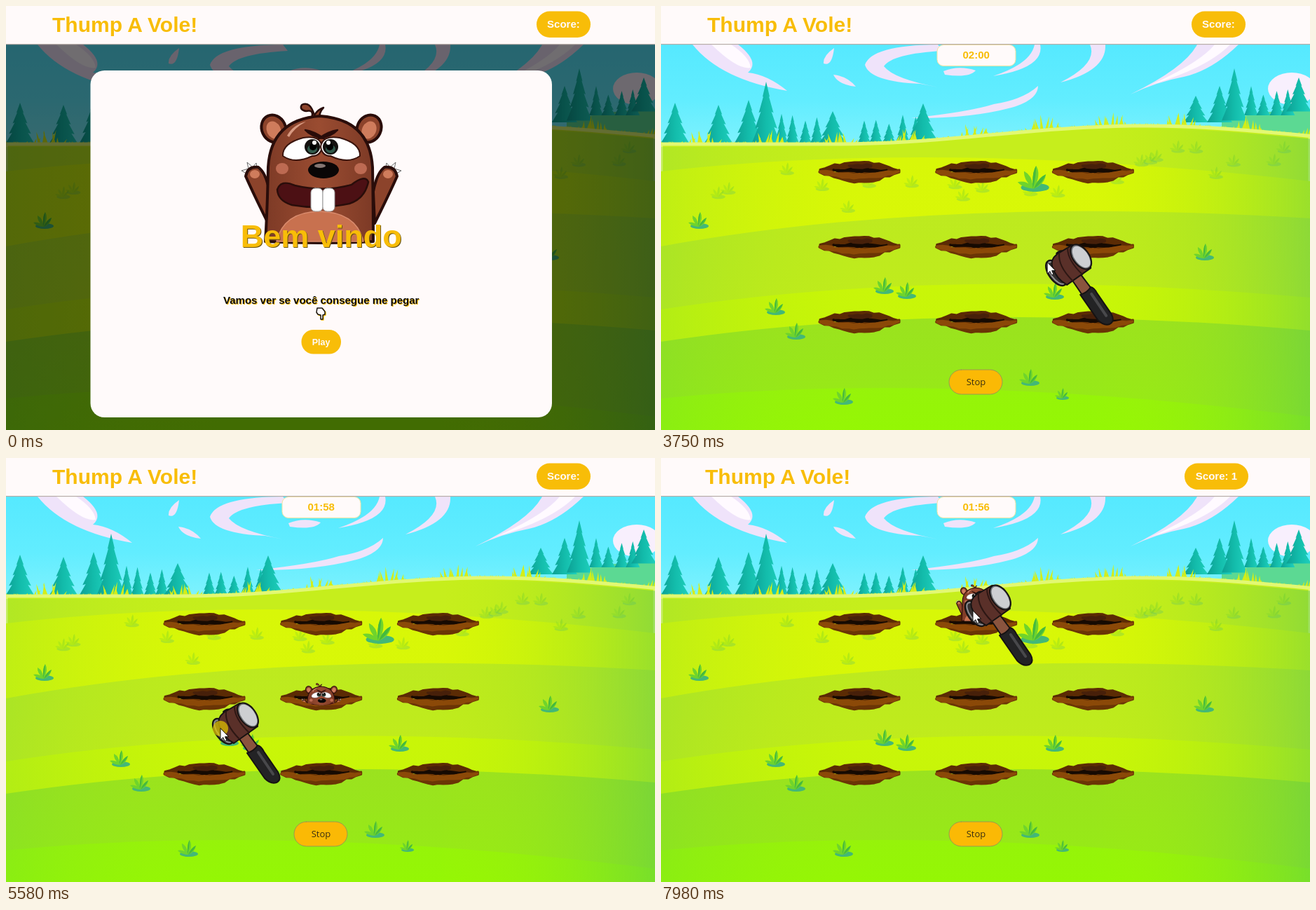
An HTML page for the animation above (8 s loop, 926 by 605 pixels).

```html
<!DOCTYPE html>
<html lang="pt">
<head>
<meta charset="utf-8">
<title>Thump A Vole!</title>
<style>
html,body{margin:0;width:100%;height:100%;overflow:hidden}
svg{display:block;width:100%;height:100%}
text{font-family:"Liberation Sans",Arial,sans-serif;font-weight:700}
.thin{font-family:"Open Sans",sans-serif;font-weight:400}
</style>
</head>
<body>
<svg id="stage" viewBox="0 0 926 605" preserveAspectRatio="none"></svg>
<script>
const LOOP = 8000, GOLD = '#f8bd08', SNOW = '#fffafa';
const stage = document.getElementById('stage');

// ---- drawing helpers ----
const path = (d, fill, extra = '') => `<path d="${d}" fill="${fill}" ${extra}/>`;
const oval = (x, y, rx, ry, fill, rot = 0, extra = '') =>
  `<ellipse cx="${x}" cy="${y}" rx="${rx}" ry="${ry}" fill="${fill}" transform="rotate(${rot} ${x} ${y})" ${extra}/>`;
const pill = (x, y, w, h, r, fill, extra = '') =>
  `<rect x="${x}" y="${y}" width="${w}" height="${h}" rx="${r}" fill="${fill}" ${extra}/>`;
const label = (x, y, size, fill, txt, extra = '') =>
  `<text x="${x}" y="${y}" font-size="${size}" fill="${fill}" ${extra}>${txt}</text>`;
const place = (x, y, body, extra = '') => `<g transform="translate(${x} ${y})" ${extra}>${body}</g>`;
const ink = (color, width) => `stroke="${color}" stroke-width="${width}" stroke-linejoin="round" stroke-linecap="round"`;
const mid = 'text-anchor="middle"';
const grad = (id, across, ...stops) => `<linearGradient id="${id}" x2="${across}" y2="${1 - across}">` +
  stops.map((c, i) => `<stop offset="${i / (stops.length - 1)}" stop-color="${c}"/>`).join('') + '</linearGradient>';

let seed = 11;
const rnd = (a = 0, b = 1) => a + (b - a) * ((seed = seed * 16807 % 2147483647) / 2147483647);
const repeat = (n, make) => Array.from({ length: n }, (_, i) => make(i)).join('');

// points of a curve y(u), u = 0..1, from x = a to x = b
const curve = (a, b, n, y, jitter = 0) => Array.from({ length: n + 1 }, (_, i) =>
  `${(a + (b - a) * i / n).toFixed(1)} ${(y(i / n) + rnd(-jitter, jitter)).toFixed(1)}`).join('L');

// ---- scenery ----
const ridge = x => 184 + 13 * Math.cos(Math.max(0, x - 250) * Math.PI / 440);

function tree(x, top, base, w) {
  const h = base - top, tiers = 4;
  const side = s => {
    const pts = [];
    for (let i = 1; i <= tiers; i++) {
      const k = i / tiers, y = top + h * k;
      pts.push(`${x + s * w / 2 * k} ${y}`);
      if (i < tiers) pts.push(`${x + s * w / 2 * k * .72} ${y - h * .02}`);
    }
    return pts;
  };
  return path(`M${x} ${top}L${side(1).join('L')}L${side(-1).reverse().join('L')}Z`, 'url(#pine)');
}

function woods() {
  const small = (from, to, base, tall) => {
    let s = '';
    for (let x = from; x < to; x += rnd(14, 23)) s += tree(x, base(x) - rnd(.6, 1) * tall, base(x), 20);
    return s;
  };
  const tall = [[20, 138], [82, 141], [125, 134], [150, 108], [245, 150], [374, 139]];
  const far = [[763, 128], [797, 114], [818, 89], [910, 102]];
  return small(172, 236, ridge, 48) + small(290, 366, ridge, 42) + tall.map(([x, y]) => tree(x, y, ridge(x), 42)).join('') +
    small(842, 895, () => 156, 46) + far.map(([x, y]) => tree(x, y, 166 - Math.max(0, x - 800) * .14, 36)).join('');
}

// grass blades whose height swells in clumps along the ridge
function fringe() {
  let d = '';
  for (let x = 4; x < 926; x += 5) {
    const swell = Math.max(0, Math.sin(x / 15.5 - 2.2)), y = ridge(x), h = 4 + 17 * swell * rnd(.5, 1.1);
    d += `M${x - 3} ${y + 5}L${x + rnd(-6, 8)} ${y - h}L${x + 3} ${y + 5}Z`;
  }
  return path(d, '#d3ee18');
}

const tuft = (x, y, s, opacity = 1) => `<use href="#tuft" transform="translate(${x} ${y}) scale(${s})" opacity="${opacity}"/>`;
const tuftShape = oval(3, 9, 13, 4, '#43b877') +
  path('M1 10Q-9 9-13 4Q-4 2 1 10Q-8 1-7-6Q1-2 1 10Q0-5 4-11Q9-3 2 10Q6 0 13-3Q12 6 2 10Z', '#6fd42c') +
  path('M2 10Q6 0 13-3Q10 5 2 10ZM1 10Q0-5 4-11Q4 0 1 10Z', '#45b93e');

function scenery() {
  const lilac = '#efe3fa';
  const clouds = 'M45 55Q85 105 180 121Q152 98 124 95Q142 80 110 55Z' +
    'M247 60Q231 71 232 82Q244 87 247 60ZM246 98Q252 112 278 115Q266 100 246 98Z' +
    'M395 55Q300 56 291 84Q298 108 370 111L396 116Q332 104 318 86Q330 68 402 64Z' +
    'M403 93Q425 84 449 92Q440 103 405 98Z' +
    'M474 100Q528 82 533 55H541Q548 88 474 100Z' +
    'M612 55Q624 82 570 109Q636 92 634 55Z' +
    'M357 160Q440 151 475 140Q518 133 538 114Q538 134 500 145Q440 161 357 160Z' +
    'M670 126Q748 88 765 55H824Q786 92 746 101Q708 108 670 126Z';
  // lower edge of each band: left, middle and right height, then its colours from top to bottom
  const bands = [
    [236, 190, 250, '#d8f708', '#dafa04'],
    [343, 270, 303, '#bdea1f', '#c4ee16'],
    [433, 370, 416, '#c9f608', '#c4f40a'],
    [479, 418, 463, '#9be21f', '#95ec14'],
    [560, 520, 586, '#96f30a', '#94f704']];
  return pill(0, 55, 926, 160, 0, 'url(#sky)') + path(clouds, lilac) +
    path('M72 55Q110 92 128 88Q126 72 100 55ZM700 112Q770 80 790 55H812Q780 88 700 112Z', '#fffaff') +
    oval(900, 118, 34, 23, '#f8effd') + path('M800 165Q870 145 926 150V200H800Z', '#5cd993') + woods() + fringe() +
    path(`M${curve(0, 926, 40, u => ridge(u * 926))}V605H0Z`, '#c6ee1c', ink('#e2f873', 5)) +
    bands.map(([l, m, r, a, b], i) => grad('band' + i, 0, a, b) +
      path(`M0 ${l}Q400 ${m} 926 ${r}V605H0Z`, `url(#band${i})`)).join('') +
    path(`M${curve(0, 926, 40, u => ridge(u * 926) + 4)}V605H0Z`, 'url(#shade)') +
    repeat(22, () => { const x = rnd(50, 910); return tuft(x, ridge(x) + rnd(16, 90), .75, .25); }) +
    [[52, 305], [773, 350], [316, 398], [348, 405], [559, 406], [161, 428], [190, 463], [524, 529], [258, 556], [571, 553]]
      .map(([x, y]) => tuft(x, y, x === 571 ? .7 : 1)).join('') + tuft(529, 245, 1.55);
}

// ---- mole: paired parts are drawn once and mirrored about x = 450 ----
const both = part => part + `<g transform="translate(900) scale(-1 1)">${part}</g>`;

function moleShape() {
  const line = ink('#2a0d0a', 4), thin = ink('#2a0d0a', 2.5);
  const fur = '#8c432b', skin = '#cf7c5c';
  const limbs = path('M345 240L336 235L346 232L344 223L352 230L357 224L359 234Z', '#fff', ink('#666', 1)) +
    path('M374 310Q354 270 342 243Q345 228 360 230Q371 238 376 265Z', fur, line) + oval(355, 240, 7, 6, skin) +
    oval(382, 175, 17, 20, fur, -25, line) + oval(382, 177, 10, 13, skin, -25);
  const face = oval(394, 232, 9, 8, '#bd6a52') +
    path('M395 214Q394 196 424 188Q449 184 451 201Q449 214 437 214Q412 226 395 214Z', '#fff', ink('#3a150e', 2)) +
    oval(437, 201, 11, 11, '#14110f') + oval(437, 204, 7, 6, '#31594a') + oval(438, 201, 5, 5, '#000') + oval(440, 195, 3, 3, '#fff') +
    path('M427 177Q440 179 454 189Q436 187 427 177Z', '#2a0d0a', thin);
  return place(-449, -137, both(limbs) +
    path('M436 160Q440 147 428 150Q418 148 422 141Q434 135 440 156Q444 148 453 145Q447 151 447 160Z', fur, thin) +
    path('M370 336Q373 290 374 230Q378 162 448 157Q519 162 523 230Q524 290 524 336Q447 340 370 336Z', 'url(#fur)', line) +
    path('M386 336Q396 294 447 293Q500 294 510 336Z', '#c8714f', ink('#d98b6d', 1.5)) +
    path('M401 185Q410 169 428 165Q411 174 404 187Z', '#d89a82') + both(face) +
    oval(453, 234, 22, 12, '#0a0606') + oval(448, 228, 8, 3, '#857672') +
    path('M387 262Q392 247 412 256Q453 266 493 255Q512 240 517 251Q512 275 490 282Q448 291 408 284Q388 278 387 262Z', '#4c1014', thin) +
    [435, 452].map(x => pill(x, 260, 17, 33, 6, '#fff', ink('#999', 1))).join(''));
}

// ---- props ----
function holeShape() {
  const arch = u => Math.sin(Math.PI * u);
  const soil = (a, b, n, top, bottom, rough, color) =>
    path(`M${curve(a, b, n, top, rough)}L${curve(b, a, n, u => bottom(1 - u), rough)}Z`, color, ink(color, 3));
  return soil(5, 117, 16, u => 16 - 12 * arch(u) ** .8, () => 17, 1.6, '#5b2b04') +
    soil(24, 100, 9, u => 16 - 3 * arch(u), u => 16 + 3 * arch(u), 1.4, '#160a02') +
    soil(46, 78, 5, () => 8, u => 9 + 3 * arch(u), 1, '#47200a') +
    soil(4, 118, 16, u => 16 + 5 * arch(u), u => 18 + 14 * arch(u) ** 1.1, 1.5, '#6a3505') +
    soil(5, 117, 14, u => 16 + 5 * arch(u), u => 18 + 9 * arch(u), 1.3, '#8b4908');
}

function hammerShape() {
  const edge = ink('#161212', 2), tilt = -36;
  return path('M25 12L37 4L56 29L42 37Z', '#8a543e', edge) +
    path('M38 35Q48 32 53 24Q58 25 62 33L82 62Q88 73 80 77Q72 80 63 71Z', '#232325', edge) +
    path('M54 34L75 65', 'none', ink('#48484b', 4)) +
    path('M4-24Q10-30 17-26L10-16Z', '#54302a', edge) +
    oval(4, 4, 11, 21, '#34302f', tilt, edge) + oval(4, 4, 8, 18.5, 'none', tilt, ink('#8d8f94', 2)) +
    path('M27-36L5-23Q-5-15-2-5Q4 13 19 21L53-3Q50-32 27-36Z', '#5a3029', edge) +
    path('M20-31Q20-14 41 6M8-24Q6-6 27 15', 'none', ink('#2d1714', 2)) +
    oval(39, -19, 11.5, 20, '#6f7276', tilt, edge) + oval(39.5, -19, 9.5, 17.5, '#cdcfd2', tilt);
}

// ---- layout ----
const spot = i => [283 + i % 3 * 166.7, 219 + 107 * Math.floor(i / 3)];
const popup = (id, i) => place(...spot(i), `<g id="${id}"><use href="#mole" transform="scale(.262)"/></g>`, 'clip-path="url(#pit)"');
const shadowed = (x, y, size, color, shade, txt) => label(x + 1, y + 1, size, shade, txt, mid) + label(x, y, size, color, txt, mid);
const hand = color => path('M444 431H451L455 436V440L452 441V447H449V441L445 440L443 437Z', color === GOLD ? GOLD : SNOW, ink(color, 1.5));

stage.innerHTML = '<defs>' +
  grad('sky', 0, '#56e9ff', '#62edff', '#86f3fd') + grad('pine', 1, '#0c9f93', '#13bcab', '#1fd0bd') +
  grad('fur', 1, '#7d3a26', '#9a4c31', '#7d3a26') +
  grad('shade', 1, '#68cf4038', '#b8f00000', '#b8f00000', '#5cc85080') +
  '<clipPath id="pit"><path d="M-34-60H34V16Q20 27 0 27Q-20 27-34 16Z"/></clipPath>' +
  `<g id="tuft">${tuftShape}</g><g id="hole">${holeShape()}</g><g id="mole">${moleShape()}</g></defs>` +
  scenery() +
  '<g id="game">' +
    repeat(9, i => `<use href="#hole" x="${spot(i)[0] - 61}" y="${spot(i)[1]}"/>`) + popup('moleA', 4) + popup('moleB', 1) +
    pill(411, 519, 76, 35, 17.5, '#fbb905', ink('#9a9a50', 1)) + label(449.5, 541, 13, '#3b3010', 'Stop', mid + ' class="thin"') +
    pill(394, 55.5, 112, 30, 9, SNOW, ink('#f3e3a0', 1)) + label(449.7, 75, 15, GOLD, '', mid + ' id="timer"') +
  '</g><g id="welcome">' +
    pill(0, 55, 926, 550, 0, '#000', 'opacity=".56"') + pill(120.5, 92, 658.5, 495, 20, SNOW) +
    '<use href="#mole" x="449" y="137"/>' +
    shadowed(449.7, 344, 45, GOLD, '#6b5310', 'Bem vindo') +
    shadowed(449.7, 424.5, 15, '#0c0a08', GOLD, 'Vamos ver se você consegue me pegar') +
    place(1, 1, hand(GOLD)) + hand('#17120c') +
    pill(421.5, 462, 56.5, 34.5, 17, GOLD) + label(449.6, 483.5, 12.5, SNOW, 'Play', mid) +
  '</g>' +
  pill(0, 0, 926, 54.5, 0, SNOW) + pill(0, 54, 926, 1.2, 0, '#b7ada8') +
  label(66, 37, 30, GOLD, 'Thump A Vole!', 'id="title"') +
  pill(757, 7.5, 77, 37.5, 18.7, GOLD, 'id="badge"') + label(795.4, 31.3, 15, SNOW, '', mid + ' id="score"') +
  `<g id="hammer">${hammerShape()}</g><circle id="click" r="11" fill="#e2c400" opacity=".72"/>` +
  '<g id="cursor">' + path('M0 0V16.2L3.8 12.7L6.2 18L8.8 16.9L6.5 11.7H11.4Z', '#fff', ink('#111', 1)) + '</g>';

// ---- motion: turning points of the pointer as time, x, y ----
const trail = [[460, 886, 603], [600, 911, 583], [850, 911, 583], [1450, 427, 420], [1680, 439, 476], [1860, 452, 472],
  [3430, 452, 472], [3660, 570, 400], [4060, 427, 270], [4200, 486, 316], [4330, 451, 310], [4420, 451, 310],
  [4900, 260, 365], [5280, 282, 411], [5500, 306, 386], [5900, 306, 386], [6780, 455, 330], [7050, 442, 246],
  [7210, 450, 164], [7510, 442, 251], [7680, 445, 218], [LOOP, 445, 218]];

const slope = (i, k) => i < 0 || i > trail.length - 2 ? 0 : (trail[i + 1][k] - trail[i][k]) / (trail[i + 1][0] - trail[i][0]);
// monotone cubic: never overshoots its points
const tangent = (i, k) => {
  const a = slope(i - 1, k), b = slope(i, k);
  return a * b <= 0 ? 0 : Math.sign(a) * Math.min(Math.abs(a), Math.abs(b));
};
function tip(t) {
  let i = 0;
  while (i < trail.length - 2 && t >= trail[i + 1][0]) i++;
  const p = trail[i], q = trail[i + 1], d = q[0] - p[0];
  const u = Math.max(0, (t - p[0]) / d), v = 1 - u;
  return [1, 2].map(k => p[k] * (1 + 2 * u) * v * v + q[k] * u * u * (3 - 2 * u) +
    d * (tangent(i, k) * u * v * v - tangent(i + 1, k) * u * u * v));
}

const RISE = 180, HAMMER_LAG = 27;
const ramp = (t, from) => { const u = Math.min(1, Math.max(0, (t - from) / RISE)); return u * u * (3 - 2 * u); };
const el = id => document.getElementById(id);
const show = (id, on) => el(id).setAttribute('display', on ? 'inline' : 'none');
const move = (id, x, y) => el(id).setAttribute('transform', `translate(${x.toFixed(2)} ${y.toFixed(2)})`);
const attrs = (id, o) => Object.entries(o).forEach(([k, v]) => el(id).setAttribute(k, v));

function render(t) {
  const playing = t >= 2540, scored = t >= 7840;
  show('welcome', !playing);
  show('game', playing);

  const left = 120 - Math.floor((t - 3540) / 1000);
  el('timer').textContent = t < 3540 ? '' : `0${Math.floor(left / 60)}:${String(left % 60).padStart(2, '0')}`;

  move('moleA', 0, 36 - 75 * (ramp(t, 5485) - ramp(t, 6540)));
  move('moleB', 0, 36 - 75 * ramp(t, 6500));

  const [x, y] = tip(t);
  show('cursor', t >= 460);
  move('cursor', x, y);
  show('hammer', t >= 3470);
  move('hammer', ...tip(t - HAMMER_LAG));
  show('click', [2340, 5520, 7710].some(c => t >= c && t < c + 200));
  move('click', x, y);

  attrs('title', { x: scored ? 63 : 66 });
  attrs('badge', scored ? { x: 747, width: 91 } : { x: 757, width: 77 });
  attrs('score', { x: scored ? 792.4 : 795.4 });
  el('score').textContent = scored ? 'Score: 1' : 'Score:';
}

const start = performance.now();
function tick() {
  render((performance.now() - start) % LOOP);
  requestAnimationFrame(tick);
}
render(0);
requestAnimationFrame(tick);
</script>
</body>
</html>
```
